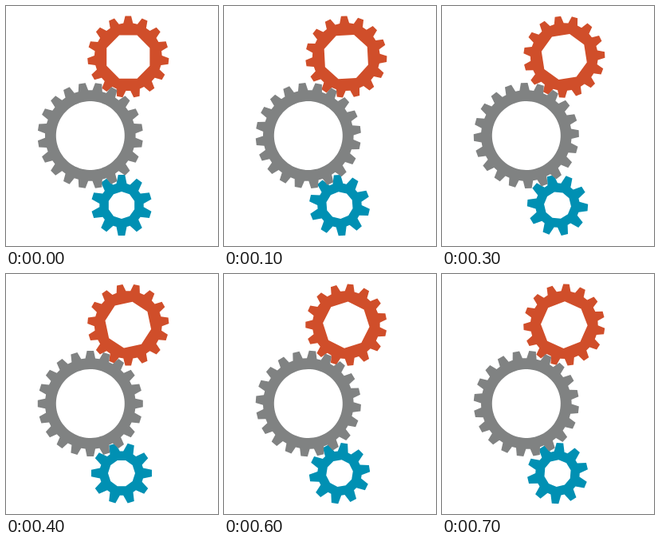
Animation, 266 px wide and 300 px high, one loop 0.8 s. Source, as an HTML page:

```html
<!DOCTYPE html>
<html lang="en">
<head>
<meta charset="utf-8">
<title>Gears</title>
<style>
  html, body { margin: 0; width: 100%; height: 100%; overflow: hidden; background: #fff; }
  svg { display: block; width: 100vw; height: 100vh; }
</style>
</head>
<body>
<svg viewBox="0 0 266 300"></svg>
<script>
const LOOP = 800, STEPS = 8;

// dir: 1 clockwise, -1 counterclockwise; phase, corner: angle of one tooth and one hole corner at time 0
const gears = [
  { x: 153.3, y: 63.6, teeth: 15, root: 42, outer: 51, base: 12, tip: 7.5, hole: 29.3, sides: 8, phase: -90, corner: 22.5, dir: -1, color: '#d04e2a' },
  { x: 145, y: 249.1, teeth: 10, root: 27, outer: 38, base: 13, tip: 8.5, hole: 17, sides: 10, phase: -90, corner: -90, dir: -1, color: '#0090b3' },
  { x: 105.8, y: 162, teeth: 20, root: 56.5, outer: 66, base: 12.5, tip: 8.5, hole: 43, sides: 90, phase: -81, corner: 0, dir: 1, color: '#808282' }
];

const svg = document.querySelector('svg');
const rad = deg => deg * Math.PI / 180;

// Point at distance r along angle a, shifted sideways by s
function point(a, r, s = 0) {
  const c = Math.cos(a), n = Math.sin(a);
  return (r * c - s * n).toFixed(2) + ' ' + (r * n + s * c).toFixed(2);
}

function outline(g) {
  const rim = [], hole = [];
  for (let i = 0; i < g.teeth; i++) {
    const a = rad(g.phase + i * 360 / g.teeth);
    rim.push(
      point(a, g.root, -g.base / 2), point(a, g.outer, -g.tip / 2),
      point(a, g.outer, g.tip / 2), point(a, g.root, g.base / 2));
  }
  for (let i = 0; i < g.sides; i++) {
    hole.push(point(rad(g.corner + i * 360 / g.sides), g.hole));
  }
  return 'M' + rim.join('L') + 'ZM' + hole.join('L') + 'Z';
}

for (const g of gears) {
  g.path = document.createElementNS('http://www.w3.org/2000/svg', 'path');
  g.path.setAttribute('d', outline(g));
  g.path.setAttribute('fill', g.color);
  g.path.setAttribute('fill-rule', 'evenodd');
  svg.append(g.path);
}

// Each loop turns every gear by one tooth
function draw(now) {
  const turn = Math.floor(now % LOOP / LOOP * STEPS) / STEPS;
  for (const g of gears) {
    const angle = g.dir * turn * 360 / g.teeth;
    g.path.setAttribute('transform', `translate(${g.x} ${g.y}) rotate(${angle})`);
  }
}

let start;
function tick(now) {
  start ??= now;
  draw(now - start);
  requestAnimationFrame(tick);
}
draw(0);
requestAnimationFrame(tick);
</script>
</body>
</html>
```
